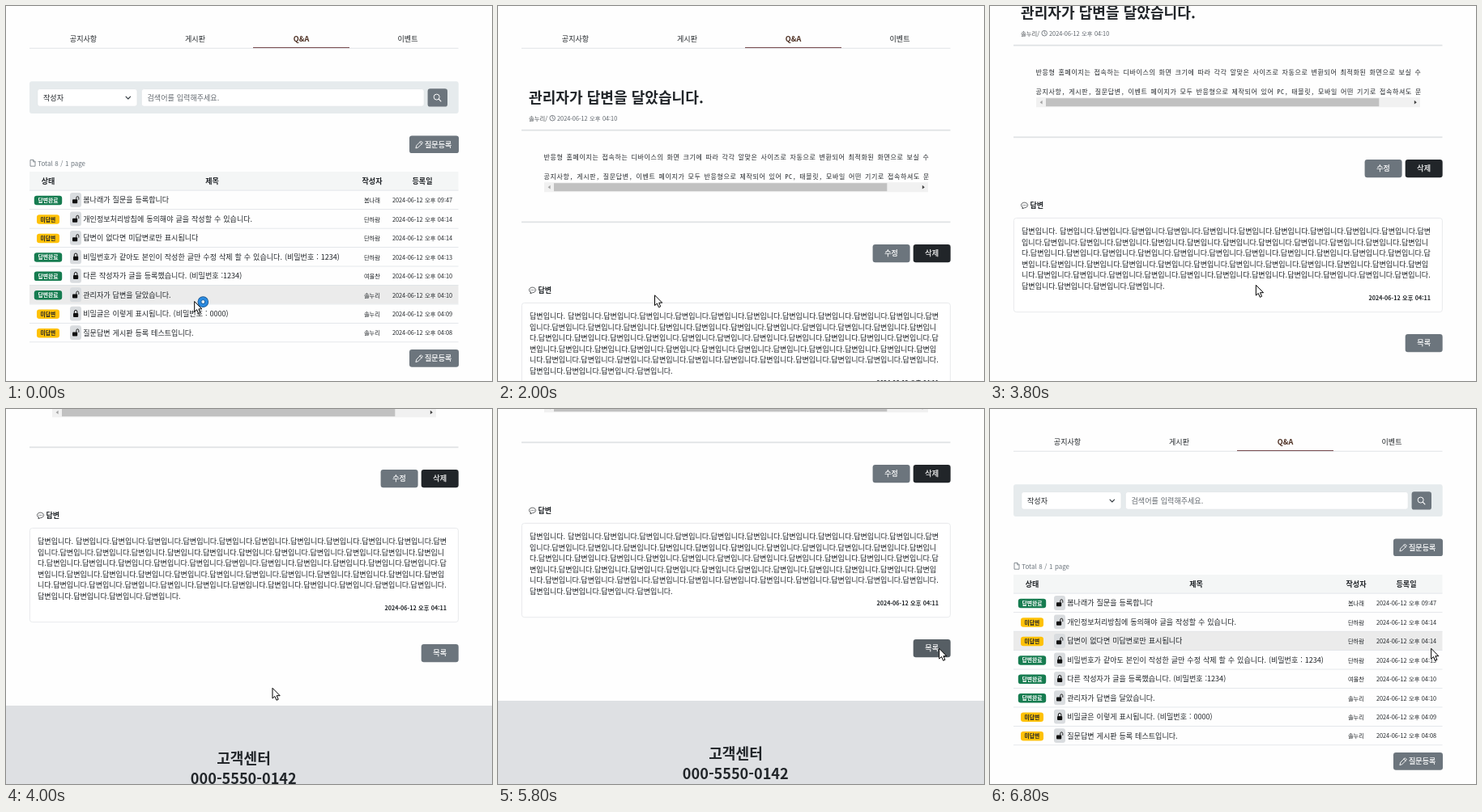
Write an HTML page that moves like this. It is 600 px wide and 464 px high and loops after 7 s.

```html
<!DOCTYPE html>
<html lang="ko">
<head>
<meta charset="utf-8">
<title>Q&amp;A 게시판</title>
<style>
  html, body { margin: 0; width: 100%; height: 100%; overflow: hidden; background: #fefefe; }
  svg { display: block; }
  text {
    font-family: "Noto Sans CJK KR", "Noto Sans CJK JP", "Noto Sans CJK", sans-serif;
    word-spacing: .048em;
    white-space: pre;
  }
  text.big { word-spacing: 0; }
  text.label { stroke: #fff; stroke-width: .2px; }
  /* full-width Hangul cells, half-width spaces */
  text.mono {
    font-family: "Noto Sans Mono CJK KR", "Noto Sans Mono CJK JP", "Noto Sans CJK KR", monospace;
    letter-spacing: .08em;
    word-spacing: -.08em;
  }
</style>
</head>
<body>
<svg id="stage" width="600" height="464" viewBox="0 0 600 464"></svg>
<script>
const REM = 9.05, SMALL = 7.33, INK = '#212529', GRAY = '#6c757d', LINE = '#dee2e6';
const LOOP = 7000, STEP = 200;
const ROW_TOP = 228.3, ROW_H = 23.45;

// y is the vertical middle of the glyphs
const text = (x, y, str, { size = REM, fill = INK, weight = 400, anchor = 'start', cls = '' } = {}) =>
  `<text class="${cls}" x="${x}" y="${(y + size * .37).toFixed(2)}" font-size="${size}" fill="${fill}"
    font-weight="${weight}" text-anchor="${anchor}">${str.replace(/&/g, '&amp;')}</text>`;
const mid = (x, y, str, opt) => text(x, y, str, { ...opt, anchor: 'middle' });
const rect = (x, y, w, h, fill, r = 0, more = '') =>
  `<rect x="${x}" y="${y}" width="${w}" height="${h}" rx="${r}" fill="${fill}" ${more}/>`;
const stroke = (d, color, width = 1, more = '') =>
  `<path d="${d}" fill="none" stroke="${color}" stroke-width="${width}" stroke-linecap="round" stroke-linejoin="round" ${more}/>`;
const button = (x, y, label, fill, id = '') =>
  rect(x, y, 46, 22.2, fill, 3.2, id && `id="${id}"`) +
  mid(x + 23, y + 11.1, label, { fill: '#fff', cls: 'label' });

const nav = () =>
  rect(29, 51.8, 529.5, .9, LINE) +
  rect(305, 51, 119, 1, '#774a4e') +
  mid(95.5, 40.5, '공지사항') + mid(233.5, 40.5, '게시판') + mid(496, 40.5, '이벤트') +
  mid(364.5, 40.5, 'Q&A', { weight: 700, fill: '#4d2f22' });

const writeButton = y =>
  rect(498, y, 61, 21.7, GRAY, 3.2) +
  stroke(`M506 ${y + 15.2}l.9 -3.1 5.4 -5.4 2.2 2.2 -5.4 5.4zM510.9 ${y + 8.1}l2.2 2.2`, '#fff', .9) +
  text(517, y + 10.8, '질문등록', { fill: '#fff', cls: 'label' });

const searchBar = () =>
  rect(29, 93.3, 529.7, 39.7, '#e6ebed', 3) +
  rect(38.8, 102.6, 123.2, 21.6, '#fff', 3, `stroke="${LINE}" stroke-width=".7"`) +
  text(46, 113.4, '작성자') +
  stroke('M148 112.2l2.8 2.8 2.8 -2.8', '#343a40', 1.1) +
  rect(167.3, 102.6, 348.9, 21.6, '#fff', 3, `stroke="${LINE}" stroke-width=".7"`) +
  text(174.5, 113.4, '검색어를 입력해주세요.', { fill: '#62686e' }) +
  rect(520.6, 102.2, 24.4, 22.4, GRAY, 3.2) +
  `<circle cx="531.7" cy="112.6" r="3.5" fill="none" stroke="#fff"/>` +
  stroke('M534.3 115.2l2.6 2.6', '#fff', 1.2);

const lock = (y, locked) =>
  rect(79, y - 9, 14, 17.8, '#d9dcdf', 3) + (locked
    ? rect(83, y - .8, 6.2, 5, '#111', 1) + stroke(`M84.3 ${y - .8}v-1.8a1.8 1.8 0 0 1 3.6 0v1.8`, '#111', 1)
    : rect(82, y - .8, 6.2, 5, '#111', 1) + stroke(`M86.8 ${y - .8}v-1.8a1.5 1.8 0 0 1 3 0v1.8`, '#111', .9));

const badge = (y, done) => done
  ? rect(34.8, y - 5.3, 34.4, 11.5, '#167c50', 3.2) + mid(52, y + .5, '답변완료', { size: 6.8, fill: '#fff', weight: 700 })
  : rect(38, y - 5.3, 28, 11.5, '#ffc107', 3.2) + mid(52, y + .5, '미답변', { size: 6.8, weight: 700 });

// answered, locked, title, writer, time
const rows = [
  [1, 0, '봄나래가 질문을 등록합니다', '봄나래', '09:47'],
  [0, 0, '개인정보처리방침에 동의해야 글을 작성할 수 있습니다.', '단하람', '04:14'],
  [0, 0, '답변이 없다면 미답변로만 표시됩니다', '단하람', '04:14'],
  [1, 1, '비밀번호가 같아도 본인이 작성한 글만 수정 삭제 할 수 있습니다. (비밀번호 : 1234)', '단하람', '04:13'],
  [1, 1, '다른 작성자가 글을 등록했습니다. (비밀번호 :1234)', '여울찬', '04:10'],
  [1, 0, '관리자가 답변을 달았습니다.', '솔누리', '04:10'],
  [0, 1, '비밀글은 이렇게 표시됩니다. (비밀번호 : 0000)', '솔누리', '04:09'],
  [0, 0, '질문답변 게시판 등록 테스트입니다.', '솔누리', '04:08'],
];

const row = ([done, locked, title, writer, time], i) => {
  const y = ROW_TOP + ROW_H * i + 11.8;
  return badge(y, done) + lock(y, locked) + text(95.3, y, title) +
    mid(452, y + .5, writer, { size: SMALL }) +
    mid(514, y + .5, `2024-06-12 오후 ${time}`, { size: SMALL }) +
    rect(29, y + 11.2, 529.5, .8, LINE);
};

const listPage = () =>
  searchBar() + writeButton(160.4) +
  stroke('M30.4 190.4h3.4l2.2 2.2v5.6h-5.6zM33.6 190.6v2.2h2.2', GRAY, .8) +
  text(39.3, 194.6, 'Total 8 / 1 page', { size: 7.94, fill: GRAY }) +
  rect(29, 205, 529.5, 23, '#f4f6f6') + rect(29, 227.7, 529.5, .8, LINE) +
  [[52, '상태'], [254.5, '제목'], [452, '작성자'], [514, '등록일']]
    .map(([x, s]) => mid(x, 216.5, s, { weight: 700 })).join('') +
  rect(29, 0, 529.5, ROW_H - .6, '#ebebeb', 0, 'id="hover"') +
  rows.map(row).join('') + writeButton(425);

const preBox = () =>
  `<clipPath id="pre"><rect x="56" y="175" width="475.7" height="60"/></clipPath><g clip-path="url(#pre)">` +
  ['반응형 홈페이지는 접속하는 디바이스의 화면 크기에 따라 각각 알맞은 사이즈로 자동으로 변환되어 최적화된 화면으로 보실 수',
   '공지사항, 게시판, 질문답변, 이벤트 페이지가 모두 반응형으로 제작되어 있어 PC, 태블릿, 모바일 어떤 기기로 접속하셔도 문']
    .map((s, i) => text(56.5, 187.2 + 24 * i, s, { size: 8, cls: 'mono' })).join('') + '</g>' +
  rect(57, 218.2, 474, 12, '#f1f1f1') + rect(69, 219.2, 411.3, 10, '#c1c1c1') +
  '<path d="M64.6 221.8v4.8l-3 -2.4z" fill="#a3a3a3"/><path d="M523.8 221.8v4.8l3 -2.4z" fill="#404040"/>';

const answer = () => {
  const all = '답변입니다.'.repeat(61);
  let at = 0;
  return [68, 68, 69, 68, 69, 24].map((n, i) => {
    let s = all.slice(at, at += n);
    if (!i) s = s.replace('.', '. ');
    return text(39, 383.6 + 13.6 * i, s);
  }).join('');
};

const heading = { size: 2 * REM, weight: 700, cls: 'big' };

const detailPage = () =>
  text(38, 113.6, '관리자가 답변을 달았습니다.', heading) +
  text(38, 139, '솔누리/', { size: SMALL, fill: '#4a4f54', weight: 500 }) +
  '<circle cx="67.2" cy="138.7" r="3.3" fill="none" stroke="#5c636a" stroke-width=".8"/>' +
  stroke('M67.2 136.6v2.3l1.4 .8', '#5c636a', .7) +
  text(73, 139, '2024-06-12 오후 04:10', { size: SMALL, fill: '#5c636a' }) +
  rect(29, 152.8, 529.5, 1.7, '#dfe2e4') + preBox() + rect(29, 266.5, 529.5, 1.7, '#dfe2e4') +
  button(462.6, 295, '수정', GRAY) + button(512.7, 295, '삭제', INK) +
  stroke('M40.3 354.2a4.1 3.3 0 1 1 2.4 .5q-1.4 1 -2.9 1 .7 -.7 .5 -1.5z', INK, .7) +
  stroke('M40.8 351.4h.01M42.6 351.4h.01M44.4 351.4h.01', INK, 1) +
  text(49.5, 351.5, '답변', { weight: 700 }) +
  rect(29.4, 367.4, 529, 116.3, '#fff', 3.2, 'stroke="#e2e5e8" stroke-width=".8"') +
  answer() +
  text(544, 466.3, '2024-06-12 오후 04:11', { size: 7.2, weight: 700, anchor: 'end' }) +
  button(512.7, 511, '목록', GRAY, 'back') +
  rect(0, 587, 600, 110, '#dee0e3') +
  mid(293.5, 652.3, '고객센터', heading) +
  mid(293.3, 677.6, '000-5550-0142', heading);

const cursor = () =>
  `<g id="arrow"><path d="M0 0V12.8L2.9 10.2 5 15 7.2 14 5.2 9.4H9.2Z" fill="#fff" stroke="#000" stroke-linejoin="round"/></g>
  <g id="busy"><circle cx="10.6" cy=".6" r="4.4" fill="#e4f1fb" stroke="#154e86" stroke-width="4.8"/>
    <circle cx="10.6" cy=".6" r="4.4" fill="none" stroke="#2b8be0" stroke-width="3.4"/></g>
  <g id="hand"><path d="M-1.3 1.2a1.3 1.3 0 0 1 2.6 0V6.2a1.2 1.2 0 0 1 2.4 .3 1.2 1.2 0 0 1 2.3 .5
    1.1 1.1 0 0 1 2.1 .7V12.4L6.6 15V18H-.4V16.2L-4 11.2a1.3 1.3 0 0 1 1.9 -1.7L-1.3 10.4Z"
    fill="#fff" stroke="#000" stroke-linejoin="round"/>
    <path d="M1.3 6.2V9.4M3.7 6.8V9.6M6 7.4V9.8" stroke="#000" stroke-width=".8"/></g>`;

document.getElementById('stage').innerHTML =
  rect(0, 0, 600, 464, '#fefefe') +
  `<g id="nav">${nav()}</g><g id="list">${listPage()}</g><g id="detail">${detailPage()}</g><g id="cursor">${cursor()}</g>`;

const el = id => document.getElementById(id);
const show = (id, on) => el(id).setAttribute('display', on ? 'inline' : 'none');

// time, x, y
const path = [
  [0, 232.7, 365.5], [400, 232.7, 365.5], [1000, 198.2, 358], [1400, 198.2, 358], [1600, 193.5, 357.8],
  [2400, 193.5, 357.8], [3200, 327.7, 345.3], [3600, 327.7, 345.3], [4000, 329, 345.3],
  [4400, 329, 345.3], [5400, 544.7, 296.3], [7000, 544.7, 296.3],
];
const scrolls = [[0, 0], [3800, 105], [4000, 220], [4200, 226], [6000, 0]];

function pointAt(t) {
  const i = path.findIndex(p => p[0] > t);
  const [t0, x0, y0] = path[i - 1], [t1, x1, y1] = path[i];
  const u = (t - t0) / (t1 - t0), k = u * u * (3 - 2 * u);
  return [x0 + (x1 - x0) * k, y0 + (y1 - y0) * k];
}

function draw(ms) {
  const t = Math.floor(ms % LOOP / STEP) * STEP;
  const [x, y] = pointAt(t);
  const onList = t < 1600 || t >= 6000;
  const scroll = scrolls.filter(s => s[0] <= t).pop()[1];
  const line = Math.floor((y - ROW_TOP) / ROW_H);
  const busy = t < 400, hand = onList && x < 203;

  show('list', onList);
  show('detail', !onList);
  for (const id of ['nav', 'detail']) el(id).setAttribute('transform', `translate(0 ${-scroll})`);
  el('hover').setAttribute('y', ROW_TOP + ROW_H * line);
  const over = x > 513 && y + scroll > 511 && y + scroll < 533;
  el('back').setAttribute('fill', over ? '#565e64' : GRAY);
  el('cursor').setAttribute('transform', `translate(${x} ${y})`);
  show('arrow', !hand);
  show('busy', busy);
  show('hand', hand);
}

const start = performance.now();
function tick() {
  draw(performance.now() - start);
  requestAnimationFrame(tick);
}
tick();
</script>
</body>
</html>
```
